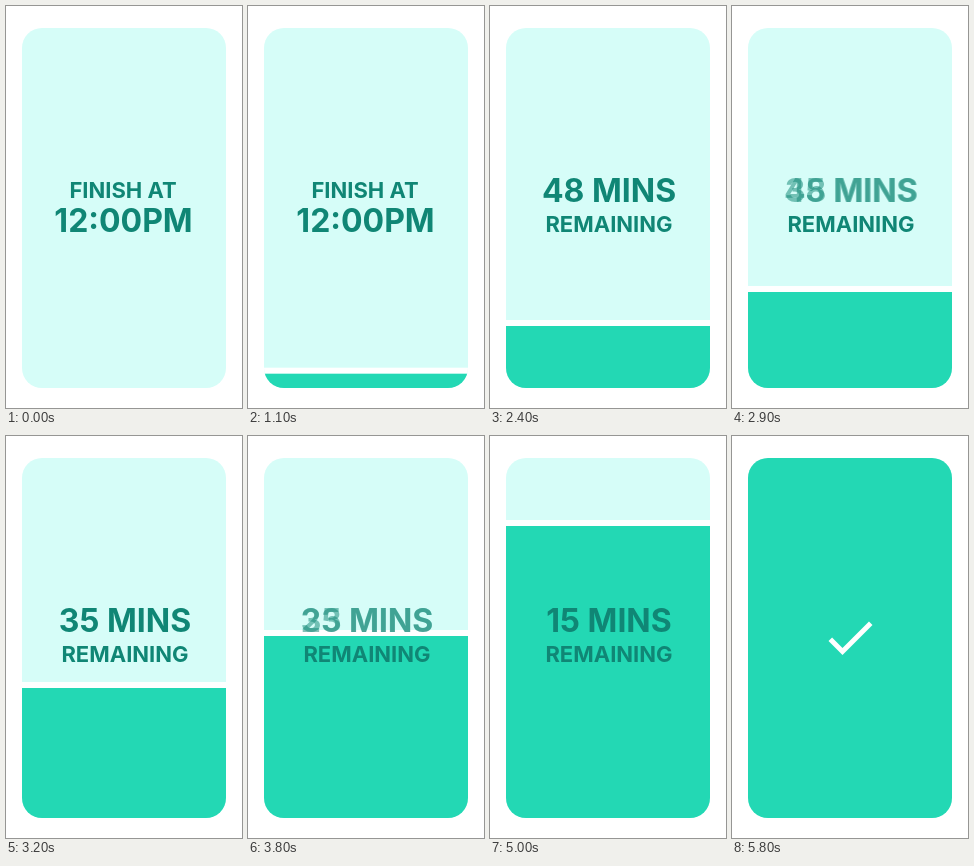
Animation of 236x402 px, one loop 6700 ms. Source, as an HTML page:

```html
<!DOCTYPE html>
<html lang="en">
<head>
<meta charset="utf-8">
<title>Countdown card</title>
<style>
html, body { margin: 0; width: 100%; height: 100%; overflow: hidden; background: #fff; }
svg { display: block; }
text { font: 700 32px Inter, sans-serif; text-anchor: middle; fill: #108675; }
.small { font-size: 22px; }
</style>
</head>
<body>
<svg width="236" height="402" viewBox="0 0 236 402">
  <clipPath id="card"><rect x="16" y="22" width="204" height="360" rx="20"/></clipPath>
  <g clip-path="url(#card)">
    <rect x="16" y="22" width="204" height="360" fill="#d6fdf8"/>
    <g id="level">
      <rect x="16" y="-6" width="204" height="6" fill="#fff"/>
      <rect x="16" width="204" height="370" fill="#23d8b4"/>
    </g>
  </g>
  <g class="layer">
    <text class="small" x="117" y="192">FINISH AT</text>
    <text x="117.5" y="226">12:00PM</text>
  </g>
  <text class="layer" x="119" y="196">48 MINS</text>
  <text class="layer" x="119" y="196">35 MINS</text>
  <text class="layer" x="119" y="196">23 MINS</text>
  <text class="layer" x="119" y="196">15 MINS</text>
  <text class="small" id="remaining" x="119" y="226">REMAINING</text>
  <path class="layer" fill="#fff" transform="translate(88 171.5) scale(2.5)"
    d="M9 16.17 4.83 12 3.41 13.41 9 19 21 7 19.59 5.59z"/>
</svg>
<script>
const LOOP = 6700, STEP = 100;
// Each move: start, duration, level reached, layer shown afterwards
const moves = [
  [800, 500, 356.7, 0],
  [1800, 600, 320, 1],
  [2600, 600, 252, 2],
  [3500, 600, 148, 3],
  [4400, 600, 90, 4],
  [5200, 600, 22, 5],
];
const level = document.getElementById('level');
const remaining = document.getElementById('remaining');
const layers = [...document.querySelectorAll('.layer')];
const ease = p => p * p * (3 - 2 * p);

function draw(t) {
  let y = 388;
  const alpha = layers.map((_, i) => i ? 0 : 1);
  for (const [start, duration, top, shown] of moves) {
    if (t <= start) break;
    const e = ease(Math.min(1, (t - start) / duration));
    y += (top - y) * e;
    alpha.forEach((a, i) => alpha[i] = a + ((i === shown) - a) * e);
  }
  level.setAttribute('transform', `translate(0 ${y})`);
  layers.forEach((el, i) => el.setAttribute('opacity', alpha[i]));
  remaining.setAttribute('opacity', alpha[1] + alpha[2] + alpha[3] + alpha[4]);
}

const origin = performance.now();
function tick() {
  const t = Math.max(0, performance.now() - origin) % LOOP;
  draw(Math.floor(t / STEP) * STEP);
  requestAnimationFrame(tick);
}
tick();
</script>
</body>
</html>
```
